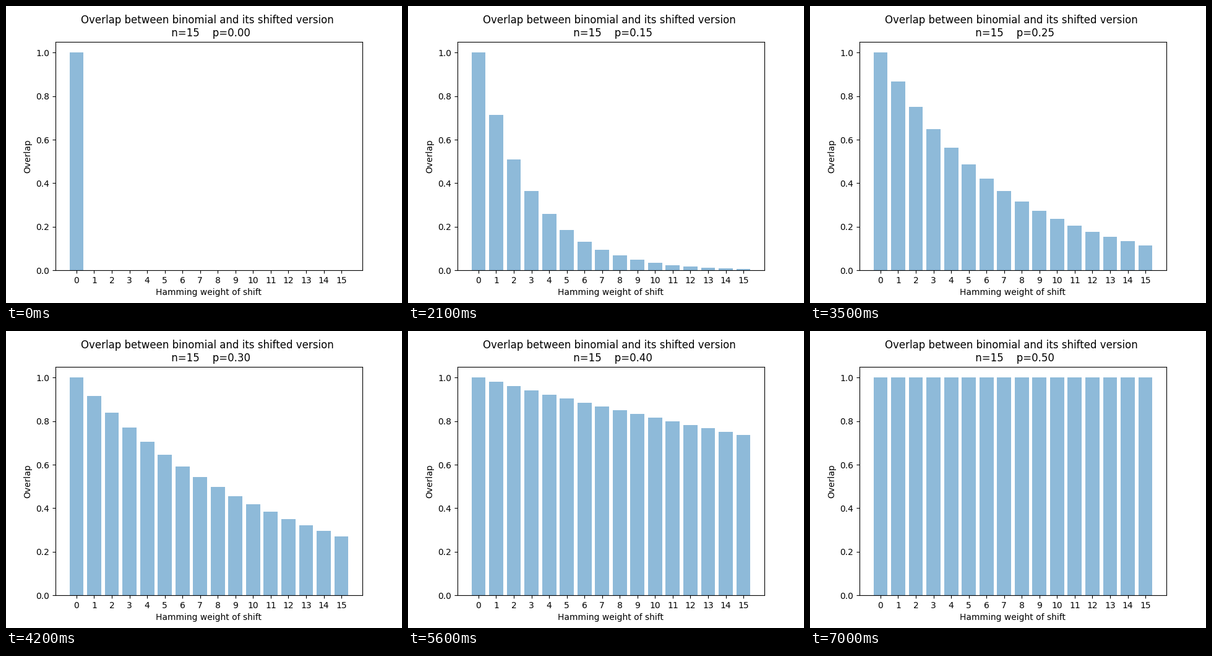
Write a matplotlib script that moves like this. It is 640 by 480 pixels and loops after 7700 ms.

```python
import numpy as np
import matplotlib.pyplot as plt
from matplotlib.animation import FuncAnimation

N = 15
STEPS = 11
INTERVAL = 700

weights = np.arange(N + 1)
probs = np.linspace(0, 0.5, STEPS)


def overlap(p):
    """Bhattacharyya overlap of the noise with its copy, per shift weight."""
    return (2 * np.sqrt(p * (1 - p))) ** weights


def title_text(p):
    return f"Overlap between binomial and its shifted version \n n={N}    p={p:.2f}"


plt.rcParams["font.family"] = "DejaVu Sans"
fig, ax = plt.subplots(figsize=(6.4, 4.8), dpi=100)
bars = ax.bar(weights, overlap(0), align="center", alpha=0.5, color="C0")
title = ax.set_title(title_text(0))
ax.set_xticks(weights)
ax.set_ylim(0, 1.05)
ax.set_xlabel("Hamming weight of shift")
ax.set_ylabel("Overlap")


def update(i):
    p = probs[i]
    for bar, height in zip(bars, overlap(p)):
        bar.set_height(height)
    title.set_text(title_text(p))
    return [*bars, title]


anim = FuncAnimation(fig, update, frames=STEPS, interval=INTERVAL,
                     repeat=True, repeat_delay=0, blit=False)
plt.show()
```
